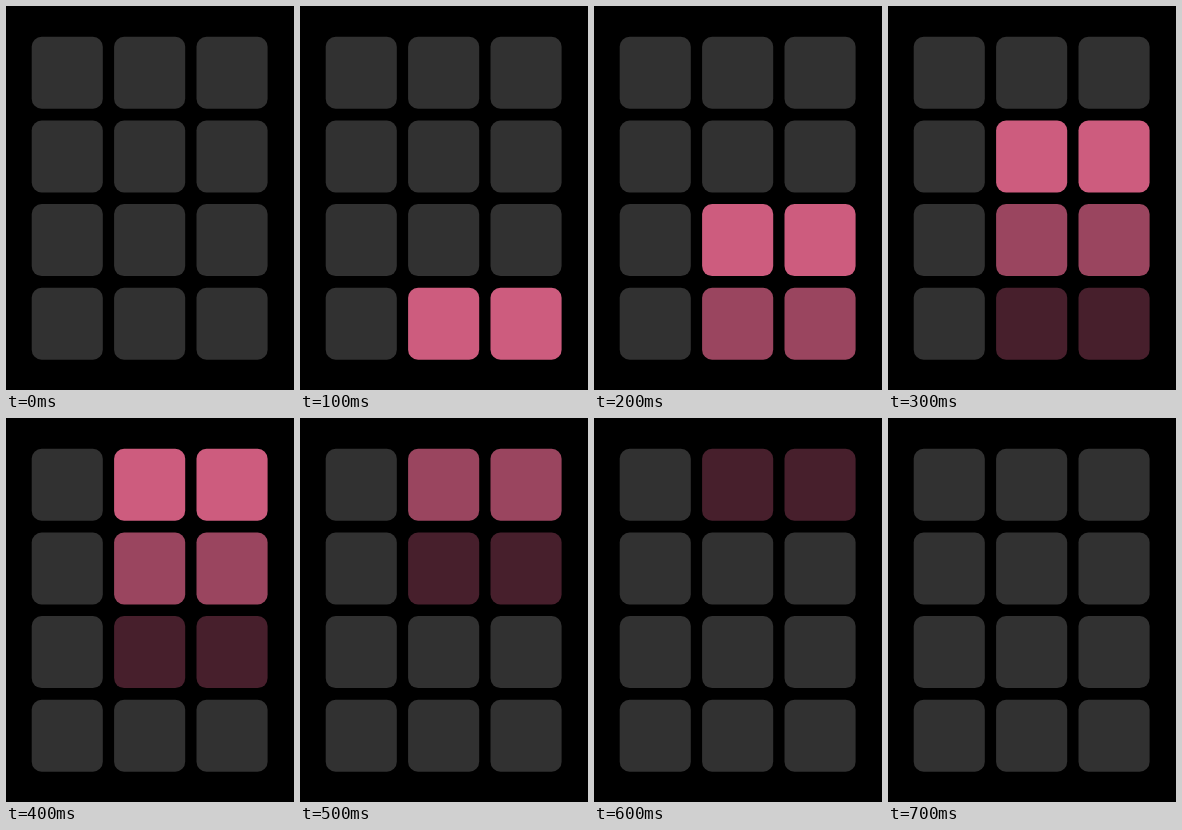
An HTML page that plays this animation: 288 by 384 pixels, repeating every 800 ms.

```html
<!DOCTYPE html>
<html lang="en">
<head>
<meta charset="utf-8">
<title>Pad grid</title>
<style>
html, body { margin: 0; width: 100%; height: 100%; overflow: hidden; background: #000; }
svg { display: block; width: 288px; height: 384px; }
</style>
</head>
<body>
<svg id="stage" viewBox="0 0 288 384"></svg>
<script>
const STEP = 100, STEPS = 8, ROWS = 4, COLS = 3;
const IDLE = '#313131';
const TRAIL = ['#cd5c7e', '#9a455f', '#471f2c'];
const stage = document.getElementById('stage');
const pads = [];

function addPad(row, col) {
  const pad = document.createElementNS('http://www.w3.org/2000/svg', 'rect');
  const attrs = {
    x: 25.7 + col * 82.4, y: 30.8 + row * 83.65,
    width: 71.1, height: 72, rx: 10, fill: IDLE
  };
  for (const key in attrs) pad.setAttribute(key, attrs[key]);
  stage.appendChild(pad);
  pads.push({ pad, row, col });
}

for (let row = 0; row < ROWS; row++)
  for (let col = 0; col < COLS; col++) addPad(row, col);

// A lit row climbs one pad per step, fading behind it in the two right columns.
function draw(time) {
  const head = ROWS - Math.floor(time / STEP) % STEPS;
  for (const { pad, row, col } of pads)
    pad.setAttribute('fill', col > 0 && TRAIL[row - head] || IDLE);
}

let start;
function tick(now) {
  start ??= now;
  draw(now - start);
  requestAnimationFrame(tick);
}
draw(0);
requestAnimationFrame(tick);
</script>
</body>
</html>
```
